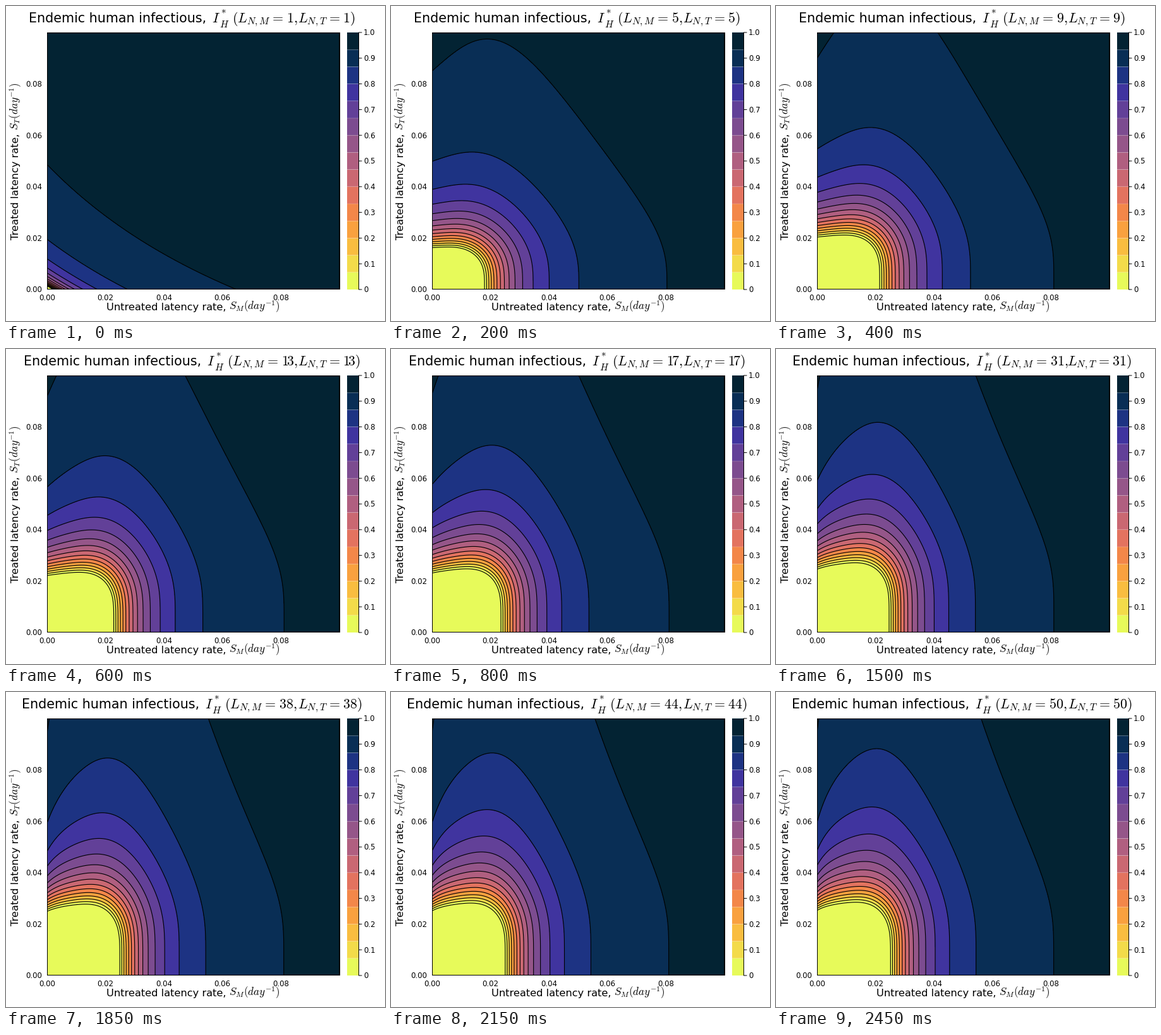
These frames come from a looping animation (600x500 px, 2500 ms). A matplotlib script:

```python
import numpy as np
import matplotlib.pyplot as plt
from matplotlib.animation import FuncAnimation
from matplotlib.colors import LinearSegmentedColormap
from matplotlib.patches import Rectangle

W, H, DPI = 600, 500, 100
STAGES, INTERVAL = 50, 50
LEFT, RIGHT, TOP, BOTTOM = 65.5, 528, 42, 450
BANDS = 15
TITLE, LABEL, TICK = 20.62, 16.2, 11.8
TITLE_MATH, LABEL_MATH = 22, 17.1

plt.rcParams["font.family"] = "DejaVu Sans"
plt.rcParams["mathtext.fontset"] = "cm"

# Heat scale, dark to bright: position in elevenths, then colour
THERMAL = [(0, (3, 35, 51)), (0.786, (9, 46, 85)), (1.571, (29, 51, 131)),
           (2.357, (64, 52, 159)), (3, (93, 62, 153)), (4, (126, 77, 143)),
           (5, (158, 89, 135)), (6, (193, 100, 121)), (7, (225, 113, 97)),
           (8, (246, 139, 69)), (9, (251, 173, 60)), (10, (246, 211, 70)),
           (11, (231, 250, 90))]
cmap = LinearSegmentedColormap.from_list(
    "heat", [(p / 11, np.array(c) / 255) for p, c in THERMAL], N=1024)
COLORS = [cmap(1 - k / (BANDS - 1)) for k in range(BANDS)]
LEVELS = np.arange(BANDS + 1) / BANDS

# Vector model: death rate, and loss rate from the first untreated stage
DEATH, LOSS = 0.121, 0.225
SWITCH = 1 - DEATH / LOSS
GAIN, SATURATION = 95, 0.87

axis = np.linspace(0, 0.1, 251)
X, Y = np.meshgrid(axis, axis)


def infectious(n):
    """Endemic infectious share for n latent stages in both vector groups."""
    nx, ny = n * X, n * Y
    treated = (ny / (ny + DEATH)) ** n
    untreated = nx / (nx + LOSS) * (nx / (nx + DEATH)) ** (n - 1)
    level = np.full_like(X, 0.5)
    for _ in range(6):
        p = 0.293 - 0.055 * np.clip(level, 0, 1)
        via_switch = (1 - p) * SWITCH
        r = treated * (p + via_switch * LOSS / (LOSS + nx)) + untreated * (1 - p)
        r *= GAIN / (p + via_switch)
        level = (r - 1) / (r + SATURATION)
    return level


def digits(n):
    """Number with the narrow figure 1 set tighter."""
    s = str(n)
    if len(s) == 2 and s[0] == "1":
        return s[0] + r"\!" + s[1]
    return s


def title_shift(n):
    if n < 10:
        return 0
    if n < 20:
        return 8
    return 10 if n % 10 == 1 else 11


def equation(sub, n):
    return rf"L_{{N,{sub}}}\hspace{{0.05}} = \hspace{{0.08}}{digits(n)}"


fig = plt.figure(figsize=(W / DPI, H / DPI), dpi=DPI, facecolor="white")
ax = fig.add_axes([LEFT / W, 1 - BOTTOM / H, (RIGHT - LEFT) / W, (BOTTOM - TOP) / H])
ax.axis("off")
page = fig.add_axes([0, 0, 1, 1], zorder=5)
page.set(xlim=(0, W), ylim=(H, 0))
page.axis("off")


def put(x, y, s, size, ha="left", va="baseline", rot=0):
    return page.text(x, y, s, fontsize=size * 72 / DPI, ha=ha, va=va,
                     rotation=rot, rotation_mode="anchor", color="black")


def rule(xs, ys, width=1.0, **style):
    page.plot(xs, ys, lw=width * 72 / DPI, solid_capstyle="butt", snap=False,
              **{"color": "black", **style})


# Frame and tick labels
rule([LEFT - 0.5, RIGHT], [TOP + 0.5] * 2)
rule([LEFT - 0.5, RIGHT], [BOTTOM - 0.5] * 2)
rule([LEFT] * 2, [TOP, BOTTOM])
rule([RIGHT] * 2, [TOP, BOTTOM], 2)
for k in range(5):
    v = 0.02 * k
    put(LEFT + (RIGHT - LEFT) * v / 0.1 - 0.3, 466.6, f"{v:.2f}", TICK, ha="center")
    put(57.5, BOTTOM - (BOTTOM - TOP) * v / 0.1 + 4.3, f"{v:.2f}", TICK, ha="right")

# Axis labels
put(159, 482.6, "Untreated latency rate,", LABEL)
put(353, 482.6, r"$S_M(day^{-1})$", LABEL_MATH)
put(20, 371, "Treated latency rate,", LABEL, rot=90)
put(20, 197, r"$S_T(day^{-1})$", LABEL_MATH, rot=90)

# Colour bar
step = (BOTTOM - TOP) / BANDS
for k, color in enumerate(COLORS):
    y = BOTTOM - (k + 1) * step
    page.add_patch(Rectangle((540, y), 18, step, facecolor=color, lw=0, snap=False))
for k in range(1, BANDS):
    rule([540, 558], [BOTTOM - k * step] * 2, 0.6, color="white", alpha=0.35)
rule([558.5] * 2, [TOP, BOTTOM])
for k in range(11):
    y = BOTTOM - (BOTTOM - TOP) * k / 10
    rule([558, 563.5], [y, y])
    put(566, y + 4.3, f"{k / 10:.1f}" if k else "0", TICK)

# Title pieces, each with its home position and direction of spread
pieces = [(put(x, y, s, size, ha, va), x, sign) for x, y, s, size, ha, va, sign in [
    (36, 26.5, "Endemic human infectious,", TITLE, "left", "baseline", -1),
    (326, 26.5, "$I$", TITLE_MATH, "left", "baseline", -1),
    (337.5, 34.5, "$H$", TITLE_MATH * 0.7, "left", "baseline", -1),
    (344.5, 7, r"$\ast$", TITLE_MATH * 0.7, "center", "center", -1),
    (357.5, 26.5, "", TITLE_MATH, "left", "baseline", -1),
    (553.5, 26.5, "", TITLE_MATH, "right", "baseline", 1),
]]
drawn = []


def update(i):
    n = i + 1
    while drawn:
        drawn.pop().remove()
    z = infectious(n)
    drawn.append(ax.contourf(X, Y, np.clip(z, 1e-6, 1), levels=LEVELS, colors=COLORS))
    drawn.append(ax.contour(X, Y, z, levels=LEVELS[:-1], colors="black",
                            linewidths=0.8, linestyles="solid"))
    ax.set(xlim=(0, 0.1), ylim=(0, 0.1))

    shift = title_shift(n)
    for text, x, sign in pieces:
        text.set_x(x + sign * shift)
    pieces[4][0].set_text(f"$({equation('M', n)},$")
    pieces[5][0].set_text(f"${equation('T', n)})$")
    return []


anim = FuncAnimation(fig, update, frames=STAGES, interval=INTERVAL,
                     init_func=lambda: [], repeat=True, repeat_delay=0, blit=False)
plt.show()
```
